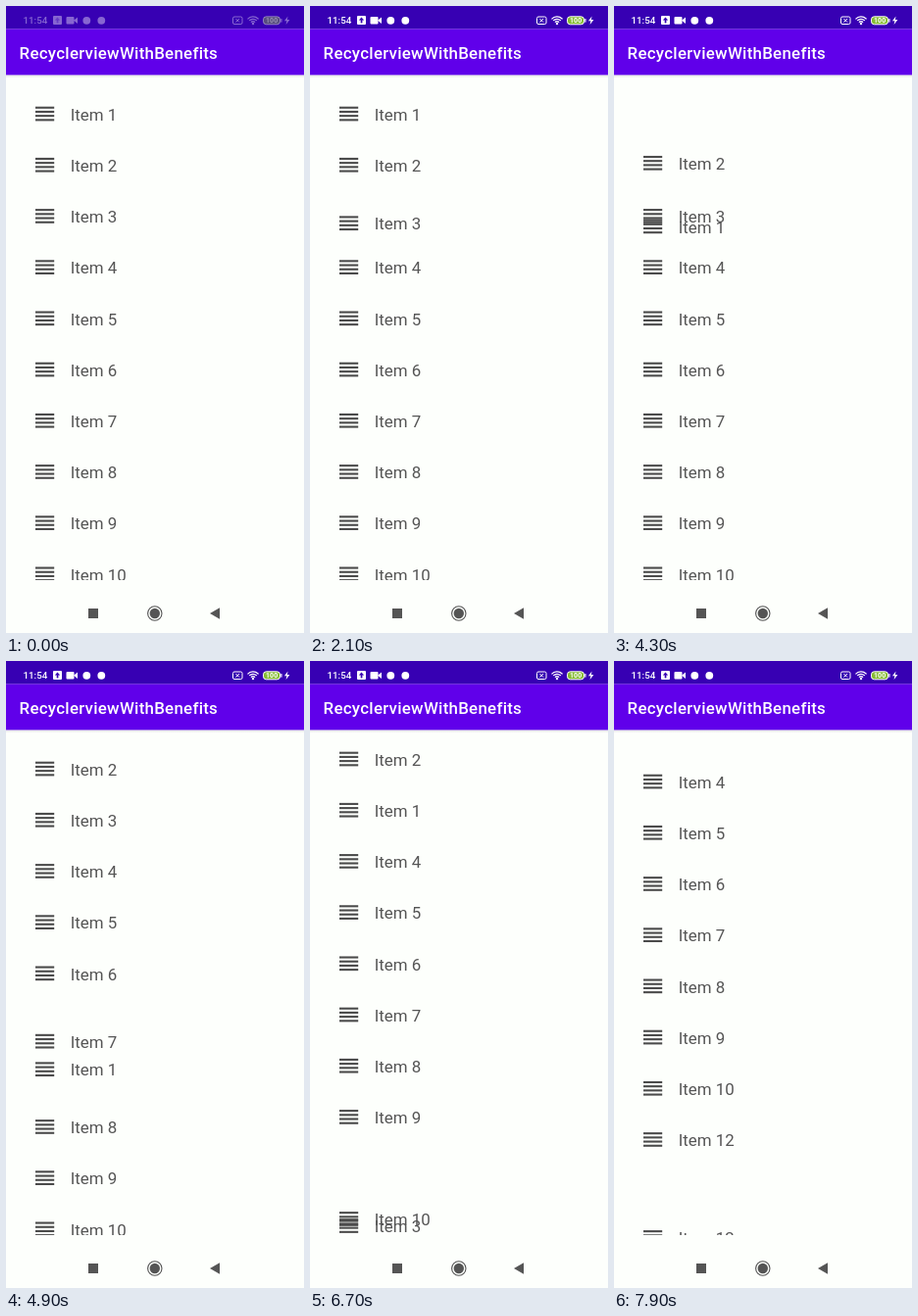
Animation of 304 by 640 pixels, one loop 8 s. Source, as an HTML page with a canvas:

```html
<!DOCTYPE html>
<html lang="en">
<head>
<meta charset="utf-8">
<title>Drag to reorder</title>
<style>
html, body { margin: 0; width: 100%; height: 100%; overflow: hidden; background: #fdfffc; }
canvas { display: block; width: 304px; height: 640px; }
</style>
</head>
<body>
<canvas id="stage"></canvas>
<script>
const W = 304, H = 640, LOOP = 8000;
const ROW = 52.2, FIRST = 110.6;
const BAR_TOP = 23.3, LIST_TOP = 70.4, LIST_BOTTOM = 586;
const MOVE_MS = 250;
const WHITE = "#fff", PAGE = "#fdfffc", STATUS = "#3700b3", GRAY = "#555";
const START = Array.from({ length: 14 }, (_, i) => i + 1).filter(id => id !== 11);

const rest = i => FIRST + ROW * i;
const scroll = t => Math.max(0, t - 6553) * 0.0678;
const slotY = (i, t) => rest(i) - scroll(t);
const ease = x => (1 - Math.cos(Math.PI * x)) / 2;

// Finger paths as [time, centre y]: pick up, carry, carry back, let go.
const DRAGS = [
  { id: 3, path: [[2000, rest(2)], [2100, 222], [2850, 428], [2900, 428], [3182, 266.5],
    [3300, 210], [3450, 200], [3700, rest(2)]] },
  { id: 1, path: [[4000, rest(0)], [4200, 130], [4268, 163], [4300, 225], [4750, 425],
    [4900, 418], [5270, 142], [5500, 145], [5700, rest(1)]] },
  { id: 3, path: [[5900, rest(2)], [6100, 232], [6440, 538], [6680, 568], [6700, 577],
    [7000, 597], [LOOP, 597]] }
];

const canvas = document.getElementById("stage");
const ctx = canvas.getContext("2d");
const dpr = window.devicePixelRatio || 1;
canvas.width = W * dpr;
canvas.height = H * dpr;

function along(path, t) {
  const i = path.findIndex(p => p[0] > t);
  const [t0, a] = path[i - 1], [t1, b] = path[i];
  return a + (b - a) * (t - t0) / (t1 - t0);
}

const dragAt = t => DRAGS.find(d => t >= d.path[0][0] && t < d.path.at(-1)[0]);

function swap(order, i, j) {
  [order[i], order[j]] = [order[j], order[i]];
}

// A row swaps places once the dragged row has passed it completely.
function findSwaps() {
  const order = START.slice(), swaps = [];
  for (let t = 0; t < LOOP; t += 2) {
    const drag = dragAt(t);
    if (!drag) continue;
    const y = along(drag.path, t), i = order.indexOf(drag.id);
    let dir = 0;
    if (i < order.length - 1 && y > slotY(i + 1, t) + 0.3) dir = 1;
    else if (i > 0 && y < slotY(i - 1, t) - 0.3) dir = -1;
    if (!dir) continue;
    swaps.push({ t, i, j: i + dir, id: order[i + dir], shift: dir * ROW });
    swap(order, i, i + dir);
  }
  return swaps;
}
const SWAPS = findSwaps();

function rect(x, y, w, h, color) {
  ctx.fillStyle = color;
  ctx.fillRect(x, y, w, h);
}

function disc(x, y, r, color) {
  ctx.fillStyle = color;
  ctx.beginPath();
  ctx.arc(x, y, r, 0, Math.PI * 2);
  ctx.fill();
}

function poly(points, color) {
  ctx.fillStyle = color;
  ctx.beginPath();
  points.forEach(([x, y]) => ctx.lineTo(x, y));
  ctx.closePath();
  ctx.fill();
}

function roundBox(x, y, w, h, r) {
  ctx.beginPath();
  ctx.roundRect(x, y, w, h, r);
}

function arc(x, y, r, from, to, width, color) {
  ctx.strokeStyle = color;
  ctx.lineWidth = width;
  ctx.beginPath();
  ctx.arc(x, y, r, from, to);
  ctx.stroke();
}

function text(str, x, y, font, color, spacing = 0) {
  ctx.font = font + " Roboto, sans-serif";
  ctx.letterSpacing = spacing + "px";
  ctx.fillStyle = color;
  ctx.fillText(str, x, y);
}

function drawRow(id, y) {
  for (let k = 0; k < 4; k++) rect(30, y - 7.9 + k * 4.2, 19.2, 2.1, "#4b4b4b");
  text("Item " + id, 65.7, y + 6.2, "16.9px", GRAY);
}

function drawList(t) {
  const order = START.slice(), shift = {};
  for (const s of SWAPS) {
    if (s.t > t) break;
    swap(order, s.i, s.j);
    const x = (t - s.t) / MOVE_MS;
    if (x < 1) shift[s.id] = s.shift * (1 - ease(x));
  }
  const drag = dragAt(t);
  ctx.save();
  ctx.beginPath();
  ctx.rect(0, LIST_TOP, W, LIST_BOTTOM - LIST_TOP);
  ctx.clip();
  order.forEach((id, i) => {
    const y = slotY(i, t) + (shift[id] || 0);
    // Rows are removed as soon as they touch the app bar.
    if (id !== drag?.id && y > LIST_TOP + 8) drawRow(id, y);
  });
  if (drag) drawRow(drag.id, along(drag.path, t));
  ctx.restore();
}

function drawStatus(t) {
  rect(0, 0, W, BAR_TOP, STATUS);
  ctx.save();
  ctx.globalAlpha = Math.min(1, 0.4 + Math.floor(t / 100) / 10);
  text("11:54", 17.4, 18, "500 9.8px", WHITE);

  ctx.fillStyle = WHITE;
  roundBox(48, 10, 9, 9, 1);
  ctx.fill();
  poly([[52.5, 11.5], [55.2, 14.5], [49.8, 14.5]], STATUS);
  rect(51.7, 14, 1.7, 3.4, STATUS);

  ctx.fillStyle = WHITE;
  roundBox(61.5, 11, 8, 7.5, 1);
  ctx.fill();
  poly([[69, 14.8], [73, 11.5], [73, 18]], WHITE);
  disc(82.3, 14.8, 3.9, WHITE);
  disc(97.3, 14.8, 3.9, WHITE);

  ctx.strokeStyle = WHITE;
  ctx.lineWidth = 1;
  roundBox(231.5, 11, 9.5, 7.5, 1.5);
  ctx.moveTo(234.5, 13);
  ctx.lineTo(238, 16.5);
  ctx.moveTo(238, 13);
  ctx.lineTo(234.5, 16.5);
  ctx.stroke();

  for (let r = 2.8; r < 8; r += 2.4) {
    arc(252, 18.5, r, -Math.PI * 0.76, -Math.PI * 0.24, 1.2, WHITE);
  }
  disc(252, 18, 1.2, WHITE);

  ctx.fillStyle = "#86bd32";
  ctx.lineWidth = 1;
  roundBox(262.5, 10.8, 17, 8, 3);
  ctx.fill();
  ctx.stroke();
  rect(280.3, 13, 1.2, 3.6, WHITE);
  text("100", 265.1, 17.4, "700 7px", WHITE);
  poly([[287.5, 10.5], [284, 15.3], [286.4, 15.3], [285.6, 19], [289.4, 13.9], [286.9, 13.9]], WHITE);
  ctx.restore();
}

function drawAppBar() {
  const shade = ctx.createLinearGradient(0, LIST_TOP, 0, LIST_TOP + 3);
  shade.addColorStop(0, "rgba(0,0,0,.1)");
  shade.addColorStop(1, "rgba(0,0,0,0)");
  rect(0, LIST_TOP, W, 3, shade);
  rect(0, BAR_TOP, W, LIST_TOP - BAR_TOP, "#6000ea");
  text("RecyclerviewWithBenefits", 13.6, 53.8, "500 16.9px", WHITE, 0.26);
}

function drawNav() {
  rect(84, 615, 10, 10, GRAY);
  disc(151.8, 620, 5.2, GRAY);
  arc(151.8, 620, 7.2, 0, Math.PI * 2, 1.1, GRAY);
  poly([[208, 620], [218, 614.3], [218, 625.7]], GRAY);
}

function draw(t) {
  ctx.setTransform(dpr, 0, 0, dpr, 0, 0);
  rect(0, 0, W, H, PAGE);
  drawList(t);
  drawAppBar();
  drawStatus(t);
  drawNav();
}

const begin = performance.now();
function tick() {
  draw((performance.now() - begin) % LOOP);
  requestAnimationFrame(tick);
}
tick();
</script>
</body>
</html>
```
